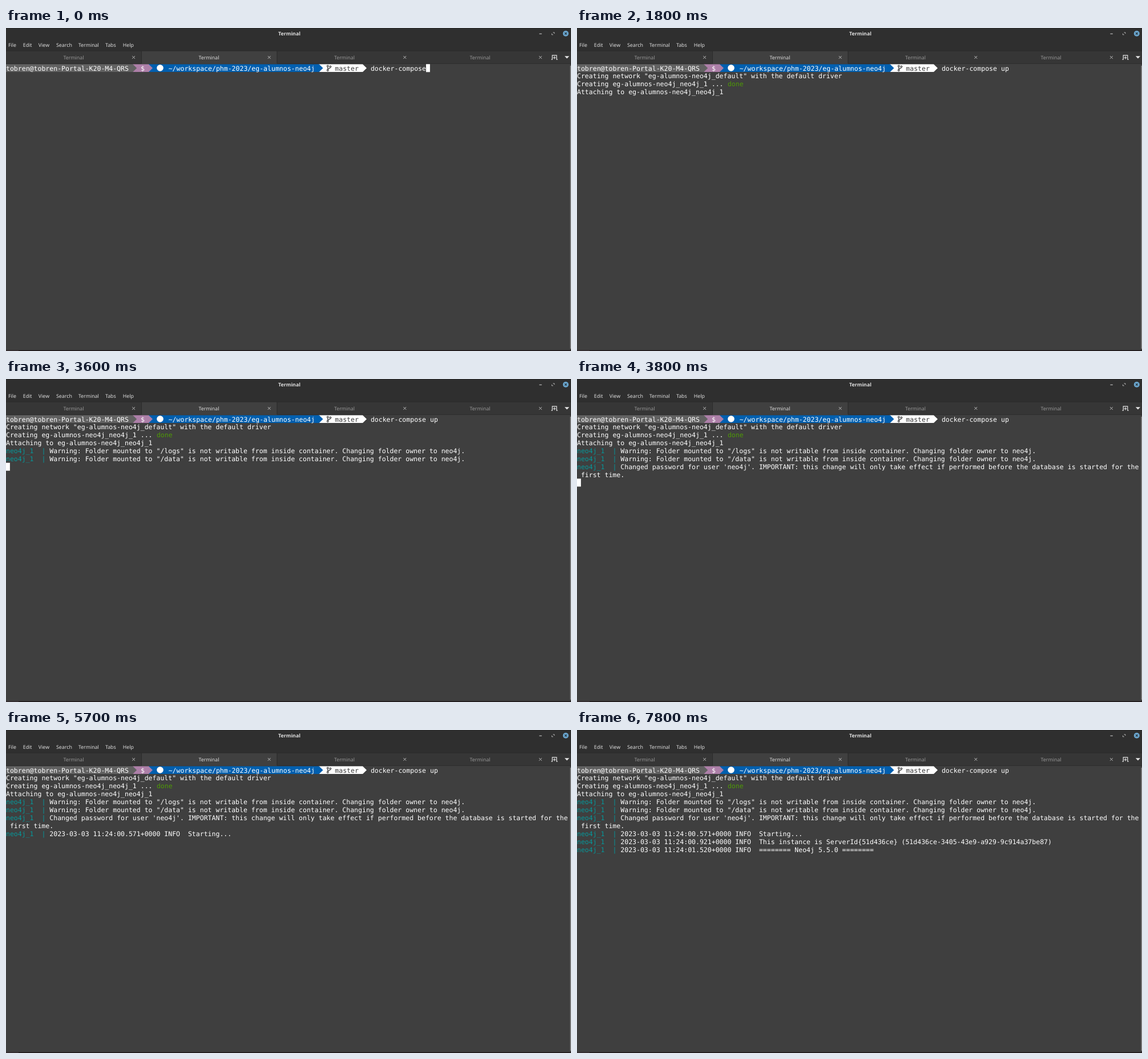
An HTML page for the animation above (8 s loop, 990 px wide and 566 px high).

```html
<!DOCTYPE html>
<html lang="en">
<head>
<meta charset="utf-8">
<title>Terminal</title>
<style>
html, body { margin: 0; width: 100%; height: 100%; overflow: hidden; background: #3f3f3f; }
svg { display: block; width: 990px; height: 566px; }
text { white-space: pre; text-rendering: geometricPrecision; }
.ui { font: 8.8px "Noto Sans", "Open Sans", sans-serif; fill: #dedede; }
.mid { text-anchor: middle; }
.dim { fill: #979797; }
.term { font: 11.534px "DejaVu Sans Mono", "Noto Sans Mono", monospace; fill: #fff; }
.svc { fill: #06989a; }
.ok { fill: #4e9a06; }

/* everything switches hard on one shared 8 s clock */
.on, .cursor { animation: 8s step-end infinite; }
.on { opacity: 0; }
.key-u { animation-name: key-u; }
.key-p { animation-name: key-p; }
.create { animation-name: create; }
.done { animation-name: done; }
.attach { animation-name: attach; }
.warn { animation-name: warn; }
.pass { animation-name: pass; }
.start { animation-name: start; }
.ident { animation-name: ident; }
.banner { animation-name: banner; }
@keyframes key-u { 0% { opacity: 0 } 2.5%, 100% { opacity: 1 } }
@keyframes key-p { 0% { opacity: 0 } 5%, 100% { opacity: 1 } }
@keyframes create { 0% { opacity: 0 } 17.5%, 100% { opacity: 1 } }
@keyframes done { 0% { opacity: 0 } 21.25%, 100% { opacity: 1 } }
@keyframes attach { 0% { opacity: 0 } 22.5%, 100% { opacity: 1 } }
@keyframes warn { 0% { opacity: 0 } 26.25%, 100% { opacity: 1 } }
@keyframes pass { 0% { opacity: 0 } 47.5%, 100% { opacity: 1 } }
@keyframes start { 0% { opacity: 0 } 71.25%, 100% { opacity: 1 } }
@keyframes ident { 0% { opacity: 0 } 75%, 100% { opacity: 1 } }
@keyframes banner { 0% { opacity: 0 } 82.5%, 100% { opacity: 1 } }

.cursor { fill: #fff; animation-name: cursor; }
@keyframes cursor {
  0% { transform: translate(736px, 63.3px); opacity: 1 }
  1.25% { transform: translate(743px, 63.3px); opacity: 1 }
  2.5% { transform: translate(750px, 63.3px); opacity: 1 }
  5% { transform: translate(757px, 63.3px); opacity: 1 }
  11.25% { transform: translate(757px, 63.3px); opacity: 0 }
  13.75% { transform: translate(0, 77.2px); opacity: 1 }
  17.5% { transform: translate(0, 105px); opacity: 1 }
  22.5% { transform: translate(0, 105px); opacity: 0 }
  28.75% { transform: translate(0, 146.8px); opacity: 1 }
  37.5% { transform: translate(0, 146.8px); opacity: 0 }
  45% { transform: translate(0, 146.8px); opacity: 1 }
  47.5% { transform: translate(0, 174.6px); opacity: 1 }
  52.5% { transform: translate(0, 174.6px); opacity: 0 }
  60% { transform: translate(0, 174.6px); opacity: 1 }
  67.5% { transform: translate(0, 174.6px); opacity: 0 }
  75% { transform: translate(0, 202.3px); opacity: 1 }
  82.5% { transform: translate(0, 202.3px); opacity: 0 }
  90% { transform: translate(0, 216.2px); opacity: 1 }
  97.5%, 100% { transform: translate(0, 216.2px); opacity: 0 }
}
</style>
</head>
<body>
<svg viewBox="0 0 990 566">
  <defs>
    <path id="x" d="M-2.4 -2.4L2.4 2.4M2.4 -2.4L-2.4 2.4" fill="none"/>
  </defs>

  <!-- window chrome -->
  <rect width="990" height="566" fill="#3f3f3f"/>
  <rect width="990" height="40" fill="#2f2f2f"/>
  <rect width="990" height="1" fill="#262626"/>
  <rect y="40" width="990" height="22.5" fill="#363636"/>
  <rect x="238" y="40" width="236.5" height="22.5" fill="#404040"/>
  <path d="M0 40.2H990M0 62.4H237.5M475 62.4H990M237.5 40V62M475 40V62" stroke="#2a2a2a" stroke-width=".8"/>
  <rect x="988.5" y="66" width="1.5" height="496" fill="#858585"/>
  <rect y="564.6" width="990" height="1.4" fill="#1b1416"/>
  <rect y="564.6" width="22" height="1.4" fill="#383034"/>

  <text class="ui mid" x="496.5" y="13.2" font-weight="700" style="font-weight:700">Terminal</text>
  <g stroke="#c8c8c8" fill="none">
    <path d="M934.4 10.2H938.8" stroke-width="1.1"/>
    <path d="M958.6 7.8H960.8V10M956.4 9.6V11.8H958.6" stroke-width=".9"/>
  </g>
  <circle cx="980.8" cy="9.8" r="5" fill="#6aa5cd"/>
  <use href="#x" transform="translate(980.8 9.8) scale(.75)" stroke="#26323a" stroke-width="1.5"/>

  <g class="ui">
    <text x="4" y="32.6">File</text>
    <text x="29.8" y="32.6">Edit</text>
    <text x="56.8" y="32.6">View</text>
    <text x="88" y="32.6">Search</text>
    <text x="126.8" y="32.6">Terminal</text>
    <text x="174" y="32.6">Tabs</text>
    <text x="204.8" y="32.6">Help</text>
  </g>
  <g class="ui mid">
    <text class="dim" x="118.4" y="54.7">Terminal</text>
    <text x="355.4" y="54.7">Terminal</text>
    <text class="dim" x="593" y="54.7">Terminal</text>
    <text class="dim" x="830.6" y="54.7">Terminal</text>
  </g>
  <g stroke="#bdbdbd" stroke-width="1">
    <use href="#x" x="223.6" y="51.4"/>
    <use href="#x" x="461.2" y="51.4"/>
    <use href="#x" x="698.8" y="51.4"/>
    <use href="#x" x="936.4" y="51.4"/>
  </g>
  <path d="M955.4 55.2H957.2V47.8H964.8V55.2H966.6M961 49.4V54.6M958.4 52H963.6" fill="none" stroke="#e6e6e6" stroke-width="1.2"/>
  <path d="M978.8 49.2H987L982.9 53.6Z" fill="#e6e6e6"/>

  <!-- prompt, widest segment first so each arrow overlaps the next -->
  <path d="M548 63.5H625L632 70.2L625 77H548Z" fill="#fff"/>
  <path d="M250 63.5H548.6L555.5 70.2L548.6 77H250Z" fill="#005faf"/>
  <path d="M222 63.5H250L257 70.2L250 77H222Z" fill="#ad7fa8"/>
  <path d="M0 63.5H222.2L229.2 70.2L222.2 77H0Z" fill="#626262"/>
  <circle cx="270" cy="70" r="5.8" fill="#fff"/>
  <g fill="none" stroke="#333" stroke-width="1.1">
    <circle cx="563.8" cy="66.7" r="1.4"/>
    <circle cx="563.8" cy="74" r="1.4"/>
    <circle cx="568.4" cy="67.6" r="1.4"/>
    <path d="M563.8 68.1V72.6M568.4 69C568.4 71.4 564 70.4 563.8 72.6"/>
  </g>

  <g class="term">
    <text x="0" y="74.5">tobren@tobren-Portal-K20-M4-QRS</text>
    <text x="236.1" y="74.5">$</text>
    <text x="284.7" y="74.5">~/workspace/phm-2023/eg-alumnos-neo4j</text>
    <text x="576.3" y="74.5" fill="#3a3a3a">master</text>
    <text x="638.9" y="74.5">docker-compose</text>
    <text class="on key-u" x="743" y="74.5">u</text>
    <text class="on key-p" x="750" y="74.5">p</text>

    <g class="on create">
      <text x="0" y="88.4">Creating network "eg-alumnos-neo4j_default" with the default driver</text>
      <text x="0" y="102.3">Creating eg-alumnos-neo4j_neo4j_1 ...</text>
    </g>
    <text class="on done ok" x="263.9" y="102.3">done</text>
    <text class="on attach" x="0" y="116.2">Attaching to eg-alumnos-neo4j_neo4j_1</text>
    <g class="on warn">
      <text x="0" y="130.1"><tspan class="svc">neo4j_1  | </tspan>Warning: Folder mounted to "/logs" is not writable from inside container. Changing folder owner to neo4j.</text>
      <text x="0" y="144"><tspan class="svc">neo4j_1  | </tspan>Warning: Folder mounted to "/data" is not writable from inside container. Changing folder owner to neo4j.</text>
    </g>
    <g class="on pass">
      <text x="0" y="157.9"><tspan class="svc">neo4j_1  | </tspan>Changed password for user 'neo4j'. IMPORTANT: this change will only take effect if performed before the database is started for the</text>
      <text x="6.9" y="171.8">first time.</text>
    </g>
    <text class="on start" x="0" y="185.7"><tspan class="svc">neo4j_1  | </tspan>2023-03-03 11:24:00.571+0000 INFO  Starting...</text>
    <text class="on ident" x="0" y="199.6"><tspan class="svc">neo4j_1  | </tspan>2023-03-03 11:24:00.921+0000 INFO  This instance is ServerId{51d436ce} (51d436ce-3405-43e9-a929-9c914a37be87)</text>
    <text class="on banner" x="0" y="213.5"><tspan class="svc">neo4j_1  | </tspan>2023-03-03 11:24:01.520+0000 INFO  ======== Neo4j 5.5.0 ========</text>
  </g>
  <rect class="cursor" width="6.9" height="13.9"/>
</svg>
</body>
</html>
```
